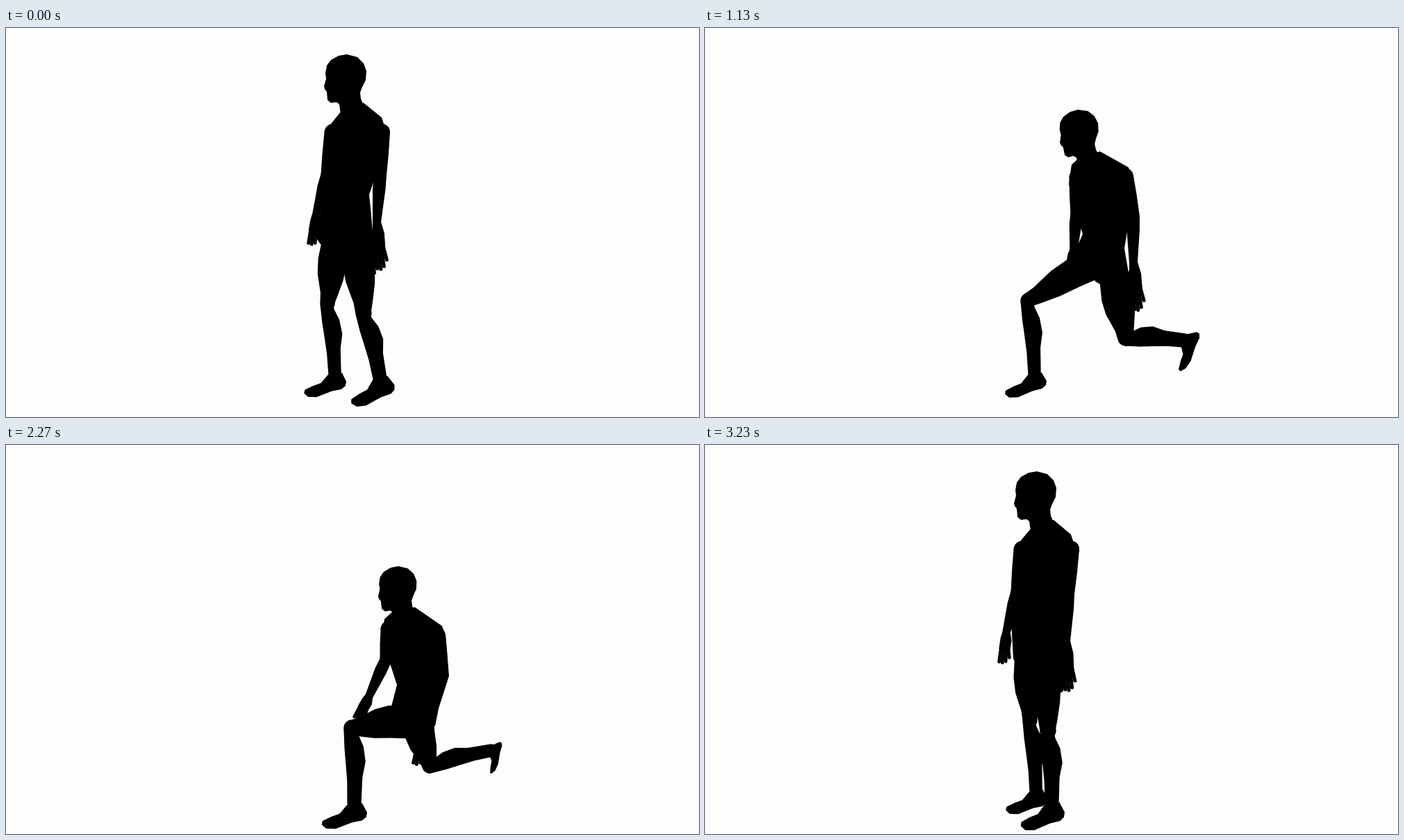
An HTML page with a canvas for the animation above (3260 ms loop, 998x561 px).

```html
<!DOCTYPE html>
<html lang="en">
<head>
<meta charset="utf-8">
<title>Reverse lunges</title>
<style>
  html, body { margin: 0; width: 100%; height: 100%; overflow: hidden; background: #fdfdfd; }
  canvas { display: block; width: 100vw; height: 100vh; }
</style>
</head>
<body>
<canvas id="stage" width="998" height="561"></canvas>
<script>
const ctx = document.getElementById('stage').getContext('2d');
const LOOP = 3260, STEP = 100 / 3;

// Head: x, y, degrees, scale. Torso: outline. Arms: shoulder, elbow, wrist, fingertip.
// Legs: hip, knee, ankle, then the toe and heel directions.
const stand = {
  head: [477, 73, 0, 1],
  torso: [468,122, 447,147, 444,172, 443,215, 441,255, 444,308, 478,380, 516,355, 520,285, 522,240, 537,160, 527,129, 502,108],
  farArm: [456,150, 449,212, 434,270, 430,315],
  nearArm: [527,150, 523,215, 520,283, 526,355],
  farLeg: [469,310, 468,397, 477,499, -40,30, 15,14],
  nearLeg: [492,310, 494,412, 500,517, -41,35, 17,16]
};
const step = {
  head: [490, 73, 0, 1],
  torso: [481,122, 461,147, 458,172, 456,215, 454,255, 450,308, 488,355, 533,355, 526,270, 523,240, 551,160, 541,129, 515,108],
  farArm: [470,150, 462,212, 447,268, 442,313],
  nearArm: [541,150, 539,212, 534,280, 542,349],
  farLeg: [478,310, 463,397, 474,499, -41,30, 15,14],
  nearLeg: [510,310, 515,411, 539,505, -37,38, 20,13]
};
const lungeFar = {
  head: [581, 197, 0, .92],
  torso: [574,232, 554,243, 547,268, 557,310, 567,335, 558,352, 577,401, 632,397, 624,369, 641,325, 643,272, 632,249, 604,228],
  farArm: [559,257, 553,300, 514,350, 487,384],
  nearArm: [631,265, 630,325, 601,395, 594,451],
  farLeg: [580,383, 471,395, 476,499, -40,30, 16,13],
  nearLeg: [607,385, 647,468, 729,440, 9,36, 17,-11]
};
const riseFar = {
  head: [540, 151, -7, .95],
  torso: [538,188, 528,197, 524,225, 535,270, 544,297, 530,330, 563,366, 618,398, 604,318, 607,300, 617,225, 610,201, 569,178],
  farArm: [536,215, 535,268, 531,320, 528,350],
  nearArm: [605,214, 617,272, 617,338, 626,408],
  farLeg: [560,341, 465,393, 475,499, -39,31, 16,13],
  nearLeg: [594,365, 606,447, 691,450, -2,42, 19,-10]
};
const lungeNear = {
  head: [565, 207, -2, .92],
  torso: [558,239, 545,251, 541,280, 554,318, 563,346, 555,377, 569,421, 618,405, 623,380, 638,333, 633,275, 628,261, 589,234],
  farArm: [551,265, 547,310, 523,362, 507,396],
  nearArm: [621,275, 628,330, 605,400, 593,462],
  farLeg: [595,400, 610,463, 699,440, 3,31, 13,-11],
  nearLeg: [576,400, 498,408, 502,518, -43,32, 17,15]
};
const leanNear = {
  head: [516, 187, -15, .95],
  torso: [517,225, 516,235, 519,255, 548,305, 552,316, 549,362, 569,398, 612,402, 617,362, 627,320, 606,248, 597,228, 548,204],
  farArm: [528,245, 537,290, 539,336, 543,370],
  nearArm: [595,246, 618,303, 625,358, 640,417],
  farLeg: [591,385, 604,434, 690,431, -2,35, 14,-10],
  nearLeg: [576,376, 498,409, 500,517, -44,32, 15,16]
};

const combine = (fn, ...poses) => Object.fromEntries(Object.keys(poses[0]).map(part =>
  [part, poses[0][part].map((_, i) => fn(...poses.map(p => p[part][i])))]));
const mix = (a, b, k) => combine((x, y) => x + (y - x) * k, a, b);
const swapLegs = p => ({ ...p, farLeg: p.nearLeg, nearLeg: p.farLeg });

const deepFar = mix(stand, lungeFar, 1.02);
const leanFar = combine((a, b, c) => a + .85 * (b - c), lungeFar, swapLegs(leanNear), swapLegs(lungeNear));

const linear = u => u;
const smooth = u => u * u * (3 - 2 * u);
const land = u => u + u * u - u * u * u;
const lift = u => 1 - land(1 - u);

// Time, pose, easing towards the next pose
const keys = [
  [0, step, land],
  [366, lungeFar, smooth],
  [680, deepFar, lift],
  [1000, leanFar, linear],
  [1133, riseFar, land],
  [1540, stand, linear],
  [1600, stand, smooth],
  [2050, mix(stand, lungeNear, .96), smooth],
  [2266, lungeNear, lift],
  [2633, leanNear, land],
  [3190, stand, linear],
  [LOOP, stand, linear]
];

const HEAD = [[1,-35], [-11,-33], [-22,-27], [-28,-19], [-30,-8], [-29,0], [-32,11], [-31,15], [-28,19], [-27,31],
  [-22,35], [-14,34], [-10,37], [-8,52], [28,46], [21,29], [20,20], [23,12], [28,2], [29,-11], [25,-22], [16,-31]];
const UPPER_ARM = [[0,-12], [.5,-11], [1,-9], [1,9], [.5,11], [0,12]];
const FOREARM = [[0,-9], [.3,-9.5], [1,-6], [1,6], [.3,9], [0,9]];
const PALM = [[0,-6], [.2,-8], [.55,-9], [.55,8], [.25,9], [0,6]];
const FINGERS = [[-6,-7,.96], [-2,-2,.98], [2,3,.93], [5,8,.8]];
const THIGH = [[0,-24], [.3,-25], [.55,-22], [.85,-13], [1,-11], [1,10], [.85,13], [.6,17], [.3,19], [0,22]];
const SHIN = [[0,-11], [.25,-11], [.45,-10], [.7,-9], [1,-10], [1,9], [.65,12], [.45,17], [.25,15], [.1,9], [0,8]];
const FOOT = [[.15,-.26], [.47,-.08], [.68,-.25], [.93,-.37], [1.02,-.2], [1.02,.18], [.85,.55], [.43,.85],
  [.2,1.14], [.05,1.12], [-.06,.91], [-.16,.22]];

const pairs = a => a.reduce((out, x, i) => (i % 2 ? out[out.length - 1].push(x) : out.push([x]), out), []);

function fill(points) {
  ctx.beginPath();
  points.forEach(p => ctx.lineTo(...p));
  ctx.fill();
}

function dot([x, y], r) {
  ctx.beginPath();
  ctx.arc(x, y, r, 0, 7);
  ctx.fill();
}

// Maps (along, across) on a bone to stage coordinates; positive across is the body's back.
function bone([ax, ay], [bx, by], scale) {
  const dx = bx - ax, dy = by - ay, k = scale / Math.hypot(dx, dy);
  return ([u, v]) => [ax + u * dx + v * dy * k, ay + u * dy - v * dx * k];
}

function line(a, b, width) {
  ctx.lineWidth = width;
  ctx.beginPath();
  ctx.moveTo(...a);
  ctx.lineTo(...b);
  ctx.stroke();
}

function drawArm(joints, scale, thumb) {
  const [shoulder, elbow, wrist, tip] = pairs(joints);
  fill(UPPER_ARM.map(bone(shoulder, elbow, scale)));
  fill(FOREARM.map(bone(elbow, wrist, scale)));
  dot(shoulder, 12 * scale);
  dot(elbow, 9 * scale);
  dot(wrist, 6 * scale);
  const at = bone(wrist, tip, scale);
  fill(PALM.map(at));
  FINGERS.forEach(([v0, v1, u]) => line(at([.5, v0]), at([u, v1]), 5 * scale));
  if (thumb) line(at([.2, -6]), at([.45, -18]), 6 * scale);
}

function drawLeg(joints, scale) {
  const [hip, knee, ankle, toe, heel] = pairs(joints);
  fill(THIGH.map(bone(hip, knee, scale)));
  fill(SHIN.map(bone(knee, ankle, scale)));
  dot(knee, 11 * scale);
  dot(ankle, 9 * scale);
  fill(FOOT.map(([a, b]) => [0, 1].map(i => ankle[i] + a * toe[i] + b * heel[i])));
}

function drawHead([x, y, degrees, scale]) {
  const r = degrees * Math.PI / 180, c = Math.cos(r) * scale, s = Math.sin(r) * scale;
  fill(HEAD.map(([px, py]) => [x + px * c - py * s, y + px * s + py * c]));
}

function poseAt(t) {
  let i = 0;
  while (i < keys.length - 2 && t >= keys[i + 1][0]) i++;
  const [t0, from, ease] = keys[i], [t1, to] = keys[i + 1];
  return mix(from, to, ease(Math.min(1, (t - t0) / (t1 - t0))));
}

function draw(now) {
  const t = Math.floor((now % LOOP + 3.4) / STEP) * STEP;
  const pose = poseAt(Math.min(t, LOOP));
  ctx.fillStyle = '#fdfdfd';
  ctx.fillRect(0, 0, 998, 561);
  ctx.fillStyle = ctx.strokeStyle = '#000';
  ctx.lineCap = 'round';
  drawLeg(pose.farLeg, .97);
  drawArm(pose.farArm, .95, false);
  fill(pairs(pose.torso));
  drawHead(pose.head);
  drawLeg(pose.nearLeg, 1.06);
  drawArm(pose.nearArm, 1, true);
}

const start = performance.now();
function tick() {
  draw(performance.now() - start);
  requestAnimationFrame(tick);
}
tick();
</script>
</body>
</html>
```
